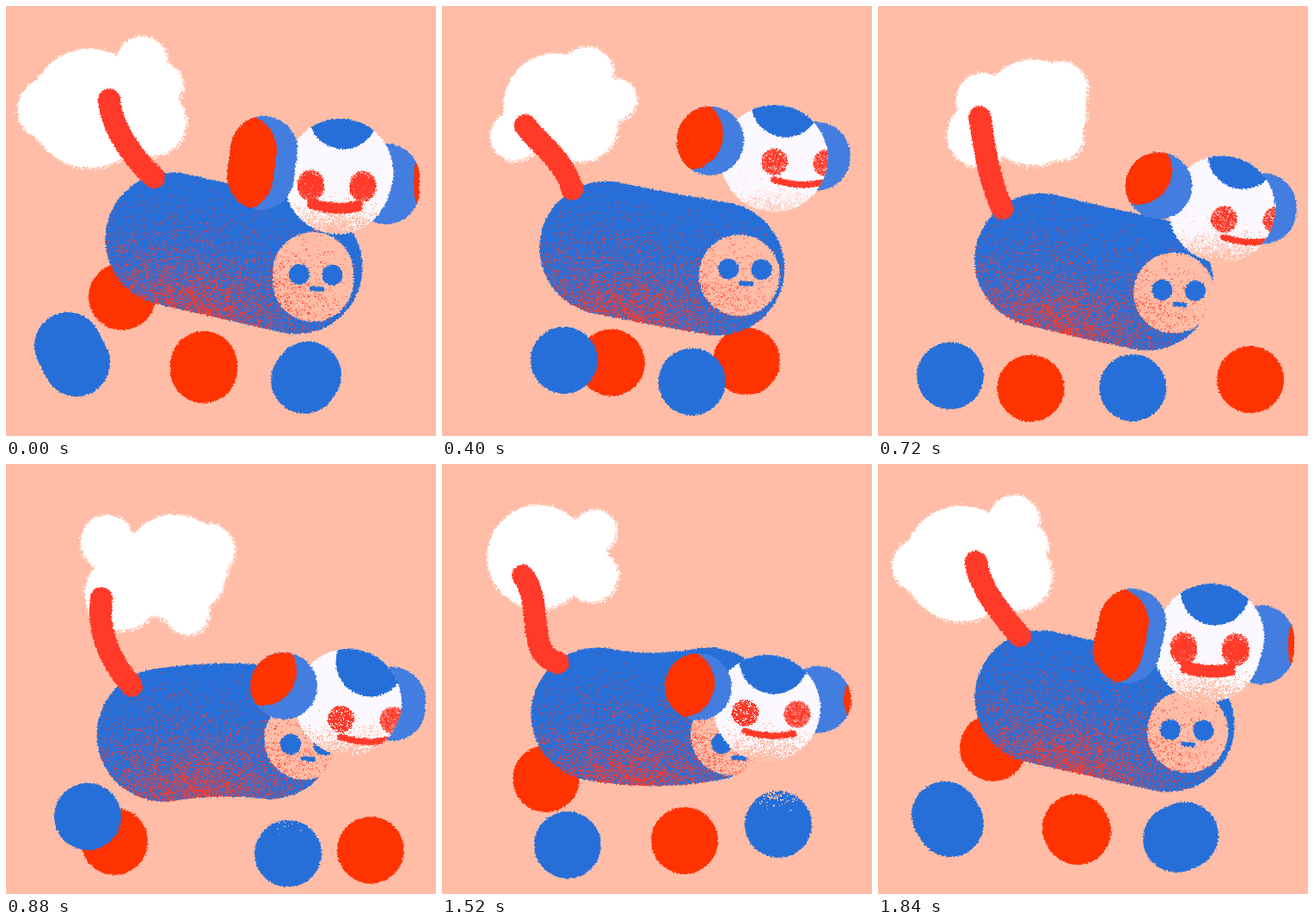
An HTML page with a canvas for the animation above (1920 ms loop, 500 by 500 pixels).

```html
<!DOCTYPE html>
<html lang="en">
<head>
<meta charset="utf-8">
<title>Walking dog</title>
<style>
  html, body { margin: 0; width: 100%; height: 100%; overflow: hidden; background: #ffbda7; }
  canvas { display: block; width: 100vw; height: 100vh; filter: url(#rough); }
  svg { position: absolute; width: 0; height: 0; }
</style>
</head>
<body>
<svg aria-hidden="true">
  <filter id="rough" x="0" y="0" width="1" height="1" color-interpolation-filters="sRGB">
    <feTurbulence type="fractalNoise" baseFrequency=".45" numOctaves="2" seed="4"/>
    <feDisplacementMap in="SourceGraphic" scale="4" xChannelSelector="R" yChannelSelector="G"/>
  </filter>
</svg>
<canvas id="stage" width="500" height="500"></canvas>
<script>
const LOOP = 1920, STEP = 80;
const PEACH = '#ffbda7', BLUE = '#266fd9', SKY = '#437de0', RED = '#ff3300',
      CORAL = '#ff3a29', WHITE = '#ffffff', PALE = '#fcf8ff';
const POSES = [0, 240, 560, 880, 1200, 1520, 1840];

const ctx = document.getElementById('stage').getContext('2d');
const layer = makeCanvas(500, 500);
const bodyCtx = layer.getContext('2d');

function makeCanvas(w, h) {
  const c = document.createElement('canvas');
  c.width = w;
  c.height = h;
  return c;
}

function randomizer(seed) {
  return () => {
    seed = (seed * 1664525 + 1013904223) >>> 0;
    return seed / 4294967296;
  };
}

// Smooth closed track through keys; returns a function of time.
function track(keys, times = POSES) {
  const n = keys.length;
  const at = i => times[(i + n) % n] + LOOP * Math.floor(i / n);
  const key = i => keys[(i + n) % n];
  return t => {
    let i = n - 1;
    while (times[i] > t) i--;
    const t0 = at(i), span = at(i + 1) - t0, u = (t - t0) / span;
    const u2 = u * u, u3 = u2 * u;
    return key(i).map((p, k) => {
      const q = key(i + 1)[k];
      const m = (q - key(i - 1)[k]) / (at(i + 1) - at(i - 1)) * span;
      const v = (key(i + 2)[k] - p) / (at(i + 2) - t0) * span;
      return (2 * u3 - 3 * u2 + 1) * p + (u3 - 2 * u2 + u) * m +
             (3 * u2 - 2 * u3) * q + (u3 - u2) * v;
    });
  };
}

// Cloud puffs: x, y, radius
const puffs = [
  track([[97,119,70], [112,110,62], [155,122,62], [196,120,62], [158,88,58], [113,108,61], [97,116,68]]),
  track([[158,65,30], [157,70,31], [185,88,32], [235,100,31], [230,83,25], [178,78,25], [158,66,30]]),
  track([[170,135,40], [163,132,45], [165,140,44], [215,125,40], [237,117,33], [174,130,31], [162,130,41]]),
  track([[180,92,26], [193,95,25], [208,127,25], [211,174,25], [165,142,26], [150,105,42], [172,95,26]]),
  track([[50,120,37], [76,153,29], [95,145,32], [135,150,44], [110,110,47], [90,105,35], [47,118,31]]),
  track([[95,116,50], [100,115,40], [122,125,32], [118,91,32], [110,88,34], [100,100,40], [95,116,50]])
];

// Tail: tip, two handles, base
const tail = track([
  [120,109, 122,140, 148,178, 172,199], [83,165, 92,195, 140,190, 158,221],
  [115,111, 132,128, 140,168, 147,208], [111,156, 106,190, 118,225, 146,258],
  [59,169, 90,195, 145,155, 166,205], [94,130, 120,165, 95,220, 135,231],
  [114,114, 118,145, 146,178, 165,200]
]);

// Body: rear, front, sag
const body = track([
  [193,271, 337,304, 0], [185,293, 322,284, -4], [196,272, 320,327, 5],
  [183,315, 307,312, -4], [187,264, 321,297, 0], [181,291, 310,291, 6], [190,271, 337,304, 0]
]);

// Discs: x, y, then half of the smear
const farRear = track([[135,338], [165,385], [213,437], [126,439], [44,387], [121,366], [134,330]]);
const farFront = track([[230,420,0,3], [281,411,0,0], [418,420,0,0], [424,449,0,0],
  [368,458,0,0], [282,438,0,0], [231,425,1,2]]);
const nearRear = track([[77,405,5,10], [115,394,6,3], [142,412,0,0], [114,441,0,0], [84,430,0,0],
  [95,410,0,0], [155,405,0,0], [164,428,0,0], [146,443,0,0], [100,435,0,0], [81,413,3,5]],
  [0, 240, 400, 560, 720, 880, 1200, 1360, 1520, 1680, 1840]);
const nearFront = track([[349,432,-2,3], [317,441,0,0], [276,434,0,0], [328,453,0,0],
  [379,440,0,0], [391,419,0,0], [352,434,-5,2]]);
const footShade = track([[45], [45], [45], [20], [0], [9], [38]]);

const belly = track([[357,315,0,5], [351,287,0,0], [342,340,0,0], [347,320,0,0],
  [344,314,0,0], [336,315,0,0], [360,311,0,1]]);
const bellyEye = track([[341,312], [337,285], [330,329], [331,326], [325,325], [325,325], [340,309]]);

const head = track([[387,198,-1.5,5], [377,172,0,0], [397,196,0,0], [398,277,0,0],
  [379,307,0,0], [378,284,0,0], [385,208,-2,7]]);
const eye = track([[354,208], [363,178], [405,199], [389,296], [351,317], [352,289], [355,214]]);
const hair = track([[392,126], [385,120], [416,119], [424,230], [391,260], [386,227], [392,147]]);
const chin = track([[0], [26], [2], [2], [0], [0], [0]]);
// Ears also carry the offset of their red patch
const nearEar = track([[298,182.5,-2,15.5,-25,0], [298,167,0,0,-25,0], [325,161,0,0,-25,-15],
  [323,258,0,0,-25,-17], [308,261,0,0,-31,0], [298,259,0,0,-21,-4], [292.5,200,-3.5,16,-21,0]]);
const farEar = track([[442,207,0,8,72,-2], [431,171,0,0,82,0], [443,194,0,0,82,0],
  [449,279,0,4,82,0], [433,317,0,0,64,5], [437,274,0,0,70,0], [445,210,0,7,72,0]]);

function stipple(w, h, color, density, seed) {
  const c = makeCanvas(w, h), g = c.getContext('2d'), rnd = randomizer(seed);
  g.fillStyle = color;
  for (let y = 0; y < h; y++)
    for (let x = 0; x < w; x++)
      if (rnd() < density(x - w / 2, y)) g.fillRect(x, y, 1, 1);
  return c;
}

const bodyShade = stipple(340, 190, CORAL,
  (x, y) => 0.66 * Math.exp(-Math.pow(Math.hypot(x / 98, (180 - y) / 62), 1.5)), 7);
const chinShade = stipple(130, 64, PEACH,
  (x, y) => 0.95 * Math.exp(-Math.pow(Math.hypot(x / 50, (64 - y) / 26), 2)), 21);
const footGrain = stipple(80, 40, PEACH,
  (x, y) => 0.7 * Math.exp(-Math.pow(Math.hypot(x / 30, y / 16), 2)), 33);
const eyeDot = stipple(34, 34, CORAL,
  (x, y) => Math.hypot(x, y - 17) < 15.5 ? 0.86 : 0, 5);

// A disc smeared along (dx, dy) in both directions
function disc(x, y, r, dx = 0, dy = 0) {
  const a = Math.atan2(dy, dx), q = Math.PI / 2, p = new Path2D();
  p.arc(x + dx, y + dy, r, a - q, a + q);
  p.arc(x - dx, y - dy, r, a + q, a + 3 * q);
  p.closePath();
  return p;
}

function fill(g, color, path) {
  g.fillStyle = color;
  g.fill(path);
}

function stroke(g, color, width, draw) {
  g.strokeStyle = color;
  g.lineWidth = width;
  g.lineCap = 'round';
  g.beginPath();
  draw(g);
  g.stroke();
}

function inside(path, draw) {
  ctx.save();
  ctx.clip(path);
  draw();
  ctx.restore();
}

function drawCloud(t) {
  const rnd = randomizer(99);
  for (const puff of puffs) {
    const [x, y, r] = puff(t);
    fill(ctx, WHITE, disc(x, y, r - 1));
    for (let i = 0; i < 260; i++) {
      const a = rnd() * Math.PI * 2, d = r - 1 + 4 * rnd() * rnd();
      ctx.fillRect(x + d * Math.cos(a), y + d * Math.sin(a), 1.2, 1.2);
    }
  }
}

function drawFoot(pos, color) {
  const [x, y, dx, dy] = pos;
  const path = disc(x, y, 39, dx, dy);
  fill(ctx, color, path);
  return path;
}

function drawBody(t) {
  const g = bodyCtx;
  const [x0, y0, x1, y1, sag] = body(t);
  const mx = (x0 + x1) / 2, my = (y0 + y1) / 2;
  g.clearRect(0, 0, 500, 500);
  stroke(g, BLUE, 155, () => {
    g.moveTo(x0, y0);
    g.quadraticCurveTo(mx, my + 2 * sag, x1, y1);
  });
  g.save();
  g.globalCompositeOperation = 'source-atop';
  const [bx, by, dx, dy] = belly(t);
  fill(g, PEACH, disc(bx, by, 47, dx, dy));
  g.save();
  g.translate(mx, my + sag);
  g.rotate(Math.atan2(y1 - y0, x1 - x0));
  g.drawImage(bodyShade, -28 - 170, 82 - 180);
  g.restore();
  const [ex, ey] = bellyEye(t);
  fill(g, BLUE, disc(ex, ey, 12));
  fill(g, BLUE, disc(ex + 38.5, ey + 0.8, 12));
  stroke(g, BLUE, 5.5, () => {
    g.moveTo(ex + 14.5, ey + 16.5);
    g.lineTo(ex + 26.5, ey + 17.5);
  });
  g.restore();
  ctx.drawImage(layer, 0, 0);
}

function drawTail(t) {
  const [x, y, ...rest] = tail(t);
  stroke(ctx, CORAL, 26, () => {
    ctx.moveTo(x, y);
    ctx.bezierCurveTo(...rest);
  });
}

function drawEar(pos) {
  const [x, y, dx, dy, ox, oy] = pos;
  const path = disc(x, y, 39, dx, dy);
  fill(ctx, SKY, path);
  inside(path, () => fill(ctx, RED, disc(x + ox, y + oy, 40, dx, dy)));
}

function drawFace(x, y) {
  ctx.drawImage(eyeDot, x - 17, y - 17);
  ctx.drawImage(eyeDot, x + 43.5, y - 15.5);
  stroke(ctx, CORAL, 7.5, () => {
    ctx.moveTo(x, y + 21.5);
    ctx.quadraticCurveTo(x + 28, y + 31, x + 57, y + 24.5);
  });
}

function drawHead(t) {
  const [x, y, dx, dy] = head(t);
  const path = disc(x, y, 62, dx, dy);
  const [ex, ey] = eye(t);
  fill(ctx, PALE, path);
  inside(path, () => {
    ctx.drawImage(chinShade, x - 70, y + dy - 2 + chin(t)[0]);
    fill(ctx, BLUE, disc(...hair(t), 40.5));
    const sy = dy * 0.5;
    drawFace(ex, ey - sy);
    if (Math.abs(sy) > 0.5) drawFace(ex, ey + sy);
  });
}

function draw(t) {
  ctx.fillStyle = PEACH;
  ctx.fillRect(0, 0, 500, 500);
  drawCloud(t);
  drawFoot(farRear(t), RED);
  drawFoot(farFront(t), RED);
  drawBody(t);
  drawTail(t);
  drawFoot(nearRear(t), BLUE);
  const front = nearFront(t);
  inside(drawFoot(front, BLUE), () =>
    ctx.drawImage(footGrain, front[0] - 42, front[1] - 40 - footShade(t)[0]));
  drawEar(farEar(t));
  drawHead(t);
  drawEar(nearEar(t));
}

const start = performance.now();
let shown = -1;

function tick() {
  const t = Math.floor((performance.now() - start) % LOOP / STEP) * STEP;
  if (t !== shown) draw(shown = t);
  requestAnimationFrame(tick);
}
tick();
</script>
</body>
</html>
```
